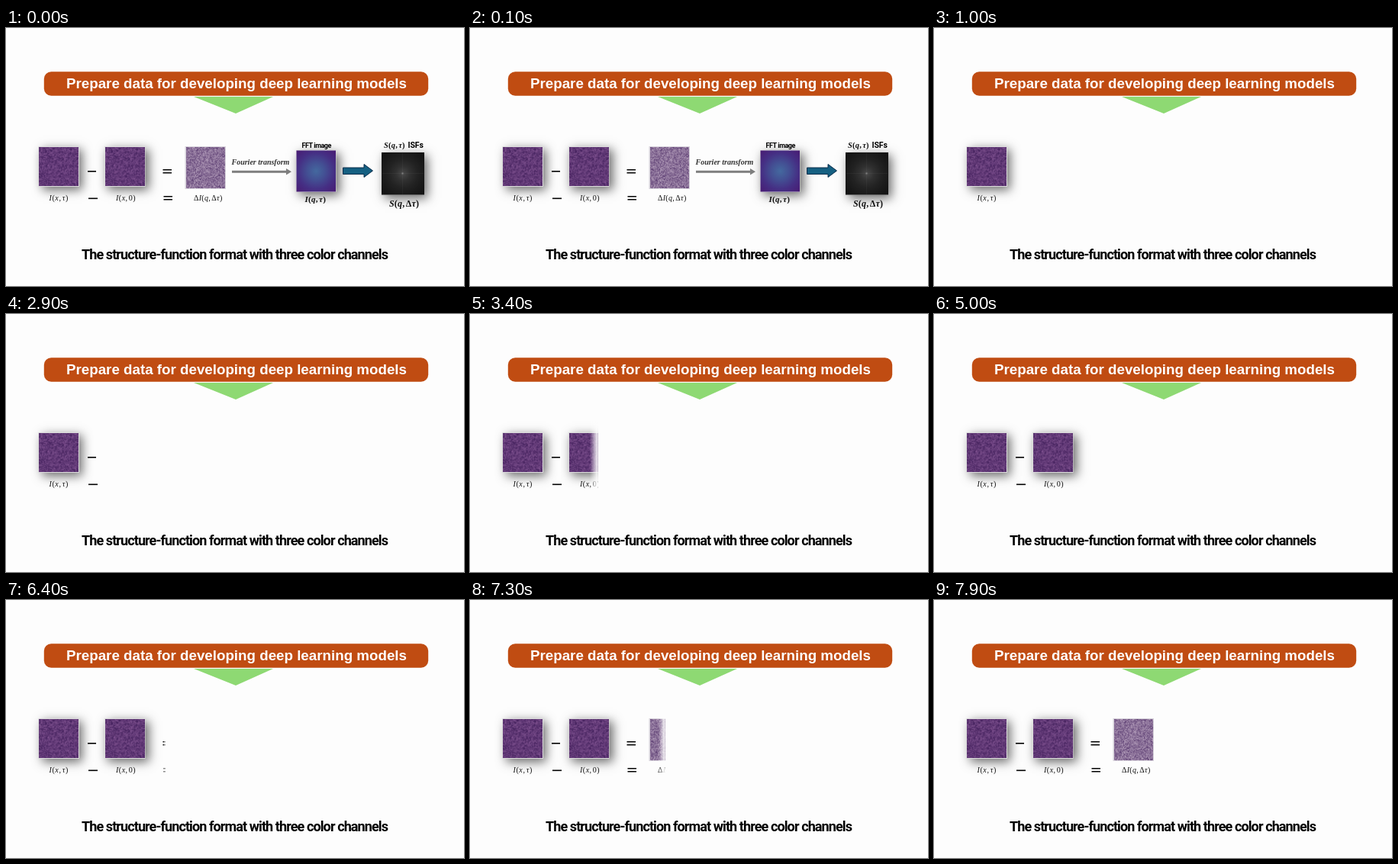
Write an HTML page with a canvas that moves like this. It is 600 by 338 pixels and loops after 8 s.

```html
<!DOCTYPE html>
<html>
<head>
<meta charset="utf-8">
<style>
html, body { margin: 0; width: 100%; height: 100%; overflow: hidden; background: #fdfdfd; }
canvas { display: block; }
</style>
</head>
<body>
<canvas id="stage" width="600" height="338"></canvas>
<script>
const ctx = document.getElementById('stage').getContext('2d');
const BG = '#fdfdfd';
const SANS = 'Roboto, sans-serif';
const MATH = '"Cambria Math", "Liberation Serif", serif';

let seed = 7;
const random = () => (seed = seed * 16807 % 2147483647) / 2147483647;

// Speckled square: low and high are the RGB ends of the grain
function grain(size, low, high) {
  const c = document.createElement('canvas');
  c.width = c.height = size;
  const g = c.getContext('2d');
  for (let y = 0; y < size; y++) for (let x = 0; x < size; x++) {
    const k = (random() + random()) / 2;
    g.fillStyle = `rgb(${low.map((v, i) => v + (high[i] - v) * k)})`;
    g.fillRect(x, y, 1, 1);
  }
  return c;
}
const violet = grain(38, [64, 30, 90], [130, 84, 146]);
const pale = grain(50, [80, 48, 104], [196, 176, 200]);

function rect(x, y, w, h, fill) {
  ctx.fillStyle = fill;
  ctx.fillRect(x, y, w, h);
}

function poly(points, fill, stroke) {
  ctx.beginPath();
  for (let i = 0; i < points.length; i += 2) ctx.lineTo(points[i], points[i + 1]);
  ctx.closePath();
  ctx.fillStyle = fill;
  ctx.fill();
  if (stroke) { ctx.strokeStyle = stroke; ctx.lineWidth = 1; ctx.stroke(); }
}

function text(str, x, y, font, fill = '#000', spacing = 0) {
  ctx.font = font;
  ctx.fillStyle = fill;
  ctx.letterSpacing = spacing + 'px';
  ctx.fillText(str, x, y);
}

// Formula: letters slanted, brackets, digits and capital delta upright
function formula(str, x, y, size, weight = '', spacing = 0) {
  for (const ch of str) {
    const style = /[A-Za-zτ]/.test(ch) ? 'italic' : '';
    text(ch, x, y, `${style} ${weight} ${size}px ${MATH}`, '#111');
    x += ctx.measureText(ch).width + spacing + (ch === ',' ? 1.2 : 0);
  }
}

function shadow(x, y, w, h) {
  ctx.save();
  ctx.shadowColor = 'rgba(0,0,0,.6)';
  ctx.shadowBlur = 13;
  ctx.shadowOffsetX = 4;
  ctx.shadowOffsetY = 4;
  rect(x, y, w, h, '#ddd');
  ctx.restore();
}

function radial(x, y, w, h, r, colors) {
  const cx = x + w / 2, cy = y + h / 2;
  const g = ctx.createRadialGradient(cx, cy, 0, cx, cy, r);
  colors.forEach((c, i) => g.addColorStop(i / (colors.length - 1), c));
  rect(x, y, w, h, g);
}

function sample(x) {
  shadow(x - 0.5, 155, 53.5, 53);
  ctx.drawImage(violet, x, 155.5, 52, 51.5);
}

function minuses() {
  rect(107, 187, 11, 1.6, '#000');
  rect(108, 222.5, 12, 1.6, '#000');
}

function second() {
  sample(129.5);
  formula('I(x,0)', 144, 225.7, 10, '', 0.5);
}

function equals() {
  for (const [x, y] of [[205.5, 185], [206.5, 220]]) {
    rect(x, y, 11.5, 1.5, '#000');
    rect(x, y + 4, 11.5, 1.5, '#000');
  }
}

function difference() {
  rect(234.5, 155, 53.5, 56, '#d8d4dc');
  ctx.drawImage(pale, 235.5, 156, 51.5, 54);
  formula('ΔI(q,Δτ)', 246, 225.7, 10, '', 0.3);
}

function transforms() {
  text('Fourier transform', 295.5, 178.5, 'italic bold 10px "Liberation Serif", serif', '#333');
  rect(296, 186.8, 72, 3, '#7f7f7f');
  poly([367, 184, 374, 188.3, 367, 192.5], '#7f7f7f');

  shadow(380, 160, 52.5, 55);
  radial(380.5, 160.5, 51.5, 54, 36, ['#44699f', '#434f93', '#452f84', '#481c74']);
  text('FFT image', 387.5, 157, `bold 9px ${SANS}`, '#000', -0.5);
  formula('I(q,τ)', 391.5, 228, 11, 'bold', 0.3);

  poly([441.5, 183, 469, 183, 469, 178.5, 480.5, 187, 469, 195.5, 469, 191.5, 441.5, 191.5], '#156082', '#0b2c4a');

  shadow(492, 163, 56, 55.5);
  radial(492, 163, 56, 55.5, 38, ['#484848', '#303030', '#222', '#191919', '#121212']);
  rect(519, 164, 1, 54, 'rgba(255,255,255,.04)');
  rect(493, 190, 54, 1, 'rgba(255,255,255,.04)');
  rect(518.5, 189.5, 2, 2, '#808080');
  formula('S(q,τ)', 495, 157, 10.5, 'bold', 0.2);
  text('ISFs', 526.5, 157, `bold 10.5px ${SANS}`, '#000', -0.1);
  formula('S(q,Δτ)', 502, 234, 12, 'bold', 0.2);
}

function fixed() {
  rect(0, 0, 600, 338, BG);
  ctx.fillStyle = '#c04c12';
  ctx.beginPath();
  ctx.roundRect(49.8, 57.2, 503.4, 31.6, 9.5);
  ctx.fill();
  text('Prepare data for developing deep learning models', 79, 79.3, 'bold 18.75px "Liberation Sans", Arial, sans-serif', '#fff');
  poly([246, 90, 350, 90, 301, 112], '#8ed973');
  sample(43);
  formula('I(x,τ)', 56.5, 225.7, 10, '', 0.6);
  text('The structure-function format with three color channels', 99, 302.5, `bold 18px ${SANS}`, '#000', -0.9);
}

// Soft-edged reveal from left to right: [draw, start ms, steps, left, right]
const wipes = [
  [minuses, 1900, 5, 106, 121],
  [second, 3200, 5, 127, 195],
  [equals, 6400, 4, 205, 219],
  [difference, 7200, 5, 234, 288]
];

function wipe(draw, start, steps, left, right, t) {
  const p = Math.min(1, (Math.floor((t - start) / 100) + 1) / steps);
  if (p <= 0) return;
  if (p === 1) return draw();
  const span = right - left, edge = left + span * p, soft = span * 0.16;
  ctx.save();
  ctx.beginPath();
  ctx.rect(left - 8, 140, edge - left + 8, 100);
  ctx.clip();
  draw();
  const g = ctx.createLinearGradient(edge - soft, 0, edge, 0);
  g.addColorStop(0, 'rgba(253,253,253,0)');
  g.addColorStop(1, BG);
  rect(edge - soft, 140, soft, 100, g);
  ctx.restore();
}

function frame(now) {
  const t = now % 8000;
  fixed();
  if (t < 1000) {
    wipes.forEach(([draw]) => draw());
    transforms();
  } else {
    wipes.forEach(w => wipe(...w, t));
  }
  requestAnimationFrame(frame);
}
requestAnimationFrame(frame);
</script>
</body>
</html>
```
